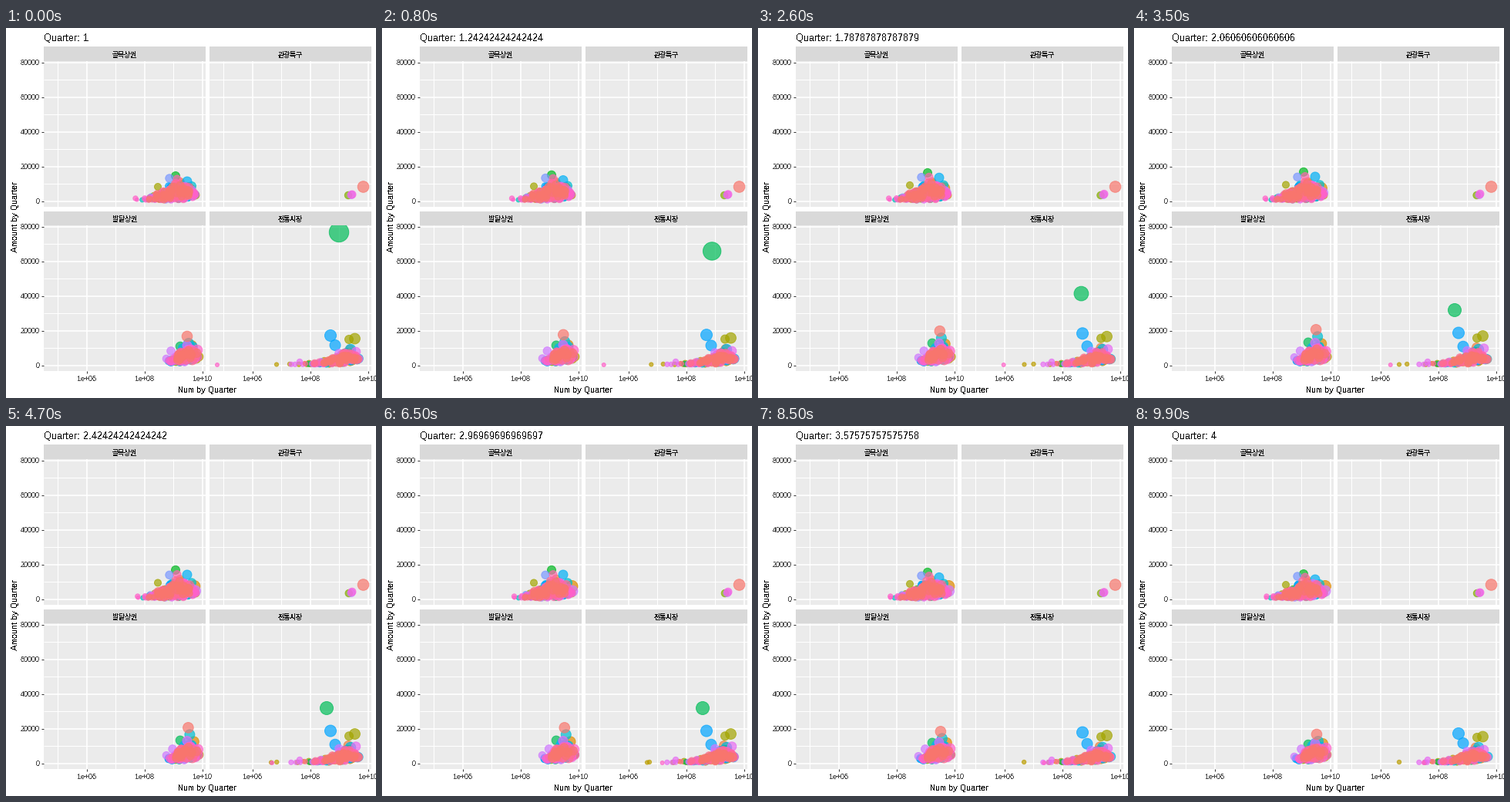
A matplotlib script that plays this animation: 480 by 480 pixels, repeating every 10 s.

```python
import numpy as np
import matplotlib.pyplot as plt
from matplotlib.animation import FuncAnimation
from matplotlib.patches import Rectangle

SIZE, FRAMES, STEP = 480, 100, 33
HUES = 25
TOP, BOTTOM = 224.5, 437.5  # zero lines of the two panel rows
T = np.linspace(0, 1, 4)  # the four quarters
SEASON = np.sin(np.pi * T)
SLIDE = 1 - (1 - T) ** 2
rng = np.random.default_rng(11)
plt.rcParams.update({
    "font.family": ["Liberation Sans", "Noto Sans CJK JP"],
    "text.hinting": "native",
    "text.hinting_factor": 1,
    "text.antialiased": False,
})


def hue_color(i, c=100, l=65):
    """Evenly spaced hue in polar LUV, returned as sRGB."""
    h = np.radians(15 + 360 * i / HUES)
    u = c * np.cos(h) / (13 * l) + 0.1978
    v = c * np.sin(h) / (13 * l) + 0.4683
    y = ((l + 16) / 116) ** 3
    x = 9 * y * u / (4 * v)
    z = -x / 3 - 5 * y + 3 * y / v
    m = [[3.2406, -1.5372, -0.4986], [-0.9689, 1.8758, 0.0415], [0.0557, -0.204, 1.057]]
    rgb = np.clip(np.dot(m, [x, y, z]), 0, 1)
    return np.where(rgb <= 0.0031308, 12.92 * rgb, 1.055 * rgb ** (1 / 2.4) - 0.055)


PALETTE = np.array([hue_color(i) for i in range(HUES)])


def bubble(hue, r, x, y, rise=0, run=0):
    """Bubble that rises and sinks over the year while sliding sideways."""
    return hue, np.c_[x + run * SLIDE, y - rise * SEASON, np.full(4, r)]


def sinking(hue, x, y, dx, dy, r0, r1):
    """Bubble that drops within one quarter, rests, then leaves."""
    f = np.minimum(3 * T, 1)
    keys = np.c_[x + dx * f, y + dy * f, r0 + (r1 - r0) * f]
    keys[-1] = np.nan
    return hue, keys


def cloud(n, base, span, shape, skew, floor, height, radii):
    """Random bubbles under a skewed hump, salmon gathered in the core."""
    out = []
    for _ in range(n):
        kind = rng.random()
        core = kind < 0.14
        hue = 0 if core else rng.integers(22, 25) if kind < 0.42 else rng.integers(1, 22)
        k = 2.2 if core else 1
        t = rng.beta(shape[0] * k, shape[1] * k)
        f = rng.beta(2, 2.8) if core else rng.beta(1.1, 1.5)
        low = floor + 8 * t ** 7
        high = max(floor + 2 + height * np.sin(np.pi * t ** skew), low)
        r = radii[0] + (radii[1] - radii[0]) * t + 0.6 * f + rng.normal(0, 0.3)
        x = span[0] + (span[1] - span[0]) * t + rng.normal(0, 0.8, 4)
        lift = low + (high - low) * f * (1 + 0.08 * SEASON) * rng.normal(1, 0.05, 4)
        out.append((hue, np.c_[x, base - lift, np.full(4, r)]))
    return out


alley = cloud(290, TOP, (166, 249), (3.6, 2.2), 2.3, 1, 22, (2.6, 4.9)) + [
    bubble(8, 5.5, 220, 192, rise=6),
    bubble(17, 5.2, 212, 195, rise=2),
    bubble(5, 4.5, 197, 206, rise=3),
    bubble(15, 6, 235, 199, rise=7),
    bubble(13, 5.5, 241, 205, rise=2),
    bubble(22, 3.2, 168, 221, run=4),
    bubble(23, 5, 222, 196, rise=4),
    bubble(2, 7.5, 236, 208, run=12),
    bubble(19, 7, 240, 214, run=8),
]

tourist = [
    bubble(6, 4.7, 444, 217, run=1),
    bubble(19, 5, 448, 216.5),
    bubble(21, 5, 449, 216, rise=1),
    bubble(0, 7.3, 463.5, 206),
]

developed = cloud(110, BOTTOM, (207, 251), (2.6, 2.1), 1.9, 4, 21, (4.4, 5.6)) + [
    bubble(0, 6.8, 235, 400, rise=10, run=2),
    bubble(13, 6.5, 237, 409, rise=10, run=2),
    bubble(9, 5.8, 226, 413, rise=6),
    bubble(22, 6.8, 248, 418, rise=-2, run=1),
    bubble(19, 5.3, 214, 419, run=3),
    bubble(19, 4.8, 208, 429, rise=2),
    bubble(16, 4.8, 211, 432),
    bubble(2, 6.5, 241, 412, rise=3, run=4),
    bubble(20, 6, 235, 412, rise=4),
    bubble(10, 6.3, 245, 425),
]

market = cloud(165, BOTTOM, (381, 458), (2.1, 1.05), 3, 1, 15, (2.8, 5.2)) + [
    sinking(9, 432, 265, -16, 101, 12.7, 8.5),
    bubble(16, 7.5, 421, 399, rise=4),
    bubble(16, 7, 427, 411.5, rise=-2),
    bubble(5, 6.9, 452.5, 403, rise=4),
    bubble(5, 5.5, 445, 404, rise=2),
    bubble(1, 5.8, 446, 417, rise=3, run=-3),
    bubble(14, 6.7, 447, 417),
    bubble(20, 5.8, 454, 420, rise=5),
    bubble(19, 5.3, 432, 422, rise=4),
    bubble(4, 2.7, 368, 436, run=-24),
    bubble(22, 2.5, 274, 437, run=102),
    bubble(20, 3.7, 381, 433),
    sinking(4, 351, 436.5, -7, 0, 2.6, 2.6),
]
market += [bubble(rng.choice([4, 8, 20, 23]), 3.1, x, 436.3, run=rng.normal(0, 4))
           for x in np.linspace(370, 390, 5)]

fig = plt.figure(figsize=(SIZE / 72, SIZE / 72), dpi=72, facecolor="white")
ax = fig.add_axes([0, 0, 1, 1])
ax.set(xlim=(0, SIZE), ylim=(SIZE, 0))
ax.axis("off")


def box(x, y, w, h, color):
    return ax.add_patch(Rectangle((x, y), w, h, fc=color, ec="none", zorder=0))


def label(x, y, s, size, color="black", **kw):
    return ax.text(x, y, s, fontsize=size, color=color, **kw)


class Panel:
    def __init__(self, x, strip, zero, name, bubbles):
        top, bottom = zero - 181.5, zero + 7.5
        box(x, strip, 210, top - strip, "#d9d9d9")
        area = box(x, top, 210, bottom - top, "#ebebeb")
        label(x + 105, top - 4.7, name, 9.2, "#1a1a1a", ha="center")
        for k in range(9):
            ax.hlines(zero - 22.5 * k, x, x + 210, color="white",
                      lw=1 if k % 2 else 1.6, zorder=1)
        for k in range(6):
            ax.vlines(x + 18 + 37.5 * k, top, bottom, color="white",
                      lw=1.6 if k % 2 else 1, zorder=1)

        # Salmon, the first hue, is painted last.
        bubbles = sorted(bubbles, key=lambda b: (b[0] - 1) % HUES)
        self.keys = np.array([b[1] for b in bubbles]).transpose(1, 0, 2)
        rgba = np.c_[PALETTE[[b[0] for b in bubbles]], np.full(len(bubbles), 0.7)]
        self.dots = ax.scatter(*self.keys[0, :, :2].T, c=rgba, edgecolors=rgba,
                               linewidths=1, zorder=2)
        self.dots.set_clip_path(area)

    def show(self, i):
        k, rest = divmod(i, STEP)
        now = self.keys[k]
        if rest:
            now = now + (self.keys[k + 1] - now) * rest / STEP
        now = np.nan_to_num(now, nan=-99)
        self.dots.set_offsets(now[:, :2])
        self.dots.set_sizes((2 * now[:, 2]) ** 2)


panels = [
    Panel(49, 24, TOP, "골목상권", alley),
    Panel(264, 24, TOP, "관광특구", tourist),
    Panel(49, 238, BOTTOM, "발달상권", developed),
    Panel(264, 238, BOTTOM, "전통시장", market),
]

for zero in (TOP, BOTTOM):
    for k in range(5):
        y = zero - 45 * k
        ax.hlines(y, 46, 49, color="#333333", lw=1)
        label(44, y + 3.3, str(20000 * k), 9, "#4d4d4d", ha="right")
for left in (104.5, 319.5):
    for k in range(3):
        x = left + 75 * k
        ax.vlines(x, 445, 448, color="#333333", lw=1)
        label(x, 458.3, f"{10.0 ** (6 + 2 * k):.0e}", 9, "#4d4d4d", ha="center")

label(261, 473, "Num by Quarter", 11, ha="center")
label(12, 245, "Amount by Quarter", 11, ha="center", va="center", rotation=90)
title = label(49, 17, "", 13)


def update(i):
    title.set_text(f"Quarter: {1 + 3 * i / (FRAMES - 1):.15g}")
    for p in panels:
        p.show(i)
    return [title] + [p.dots for p in panels]


anim = FuncAnimation(fig, update, frames=FRAMES, interval=100, repeat=True, repeat_delay=0)
plt.show()
```
